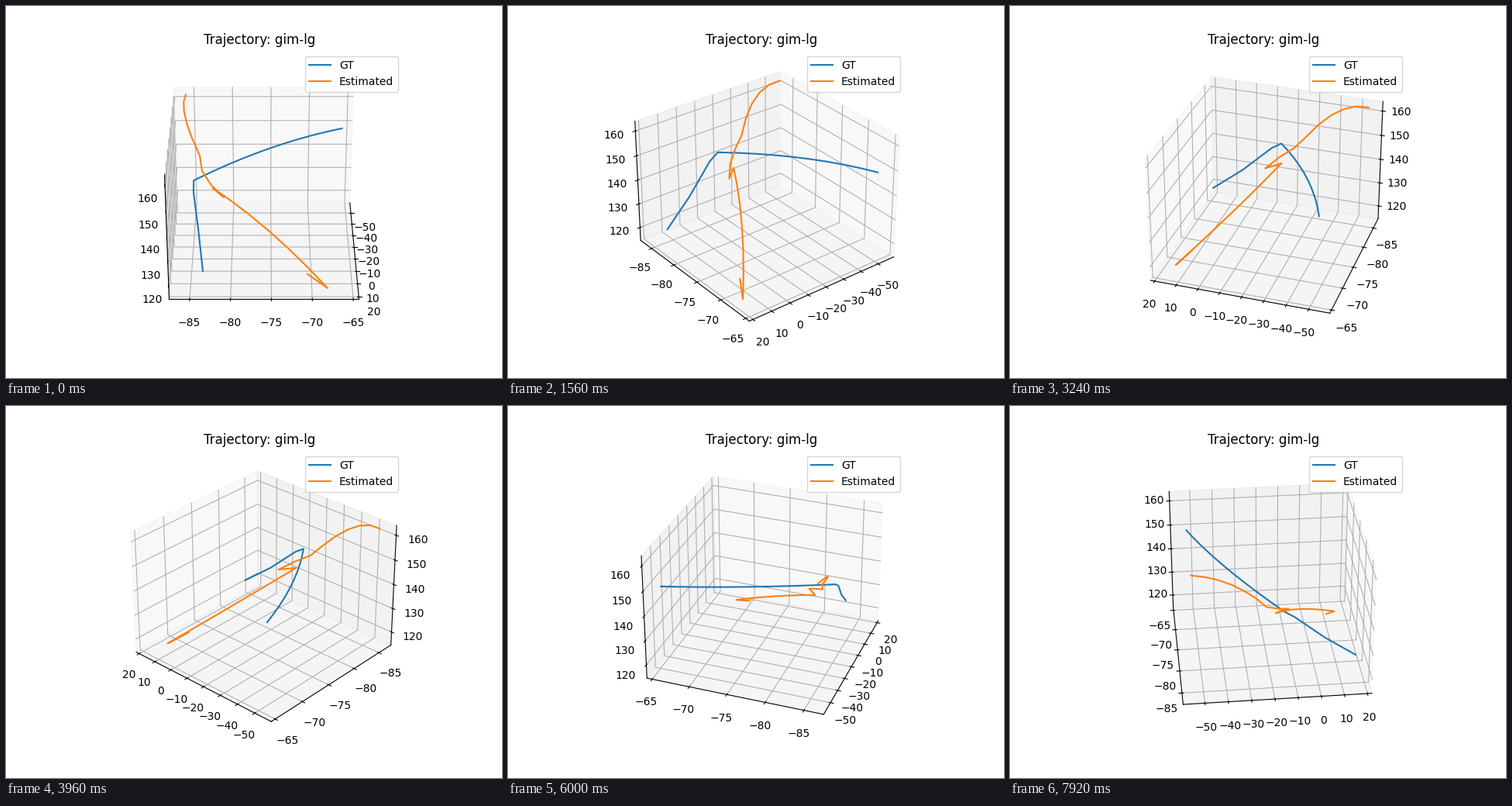
These frames come from a looping animation (640x480 px, 8000 ms). A matplotlib script:

```python
import numpy as np
import matplotlib.pyplot as plt
from matplotlib.animation import FuncAnimation

TICK = 40          # ms per animation frame
HOLD = 3           # frames that share one camera angle
LOOP = 8000        # ms
STEP = 4           # degrees per turn


def arc(start, pull, end, n):
    """Quadratic Bezier curve sampled at n points."""
    t = np.linspace(0, 1, n)[:, None]
    start, pull, end = map(np.array, (start, pull, end))
    return (1 - t) ** 2 * start + 2 * t * (1 - t) * pull + t ** 2 * end


# a steady climb, then a wide bend
truth = np.vstack([
    (16.73, -83.38, 123.25), (2.69, -83.98, 132.25), (-10.41, -84.67, 142.21),
    arc((-15.06, -84.68, 144.77), (-40.14, -75.22, 148.85),
        (-52.30, -65.77, 149.68), 10),
])

# an arc down to a small kink, then a long bow that ends in a hook
estimate = np.vstack([
    arc((-54.13, -85.99, 162.89), (-39.88, -86.88, 162.86),
        (-26.85, -84.01, 149.54), 6),
    (-22.25, -83.70, 145.30), (-16.38, -82.53, 142.29), (-11.63, -80.93, 139.42),
    arc((-17.81, -82.34, 140.34), (-5.54, -75.20, 130.75),
        (15.22, -68.07, 115.41), 7),
    (10.26, -70.53, 118.62),
])

fig = plt.figure(figsize=(6.4, 4.8), dpi=100)
ax = fig.add_subplot(projection="3d")
ax.plot(*truth.T, label="GT")
ax.plot(*estimate.T, label="Estimated")
ax.set(xlim=(-59.3, 21.9), ylim=(-87.51, -64.29), zlim=(114.42, 163.88))
ax.set_title("Trajectory: gim-lg", x=0.498)
ax.legend(loc="best")   # moves aside when a line crosses it


def turn(i):
    ax.view_init(elev=30, azim=STEP * (i // HOLD))
    return []


anim = FuncAnimation(fig, turn, frames=LOOP // TICK, init_func=lambda: turn(0),
                     interval=TICK, repeat=True, repeat_delay=0, blit=False)
plt.show()
```
